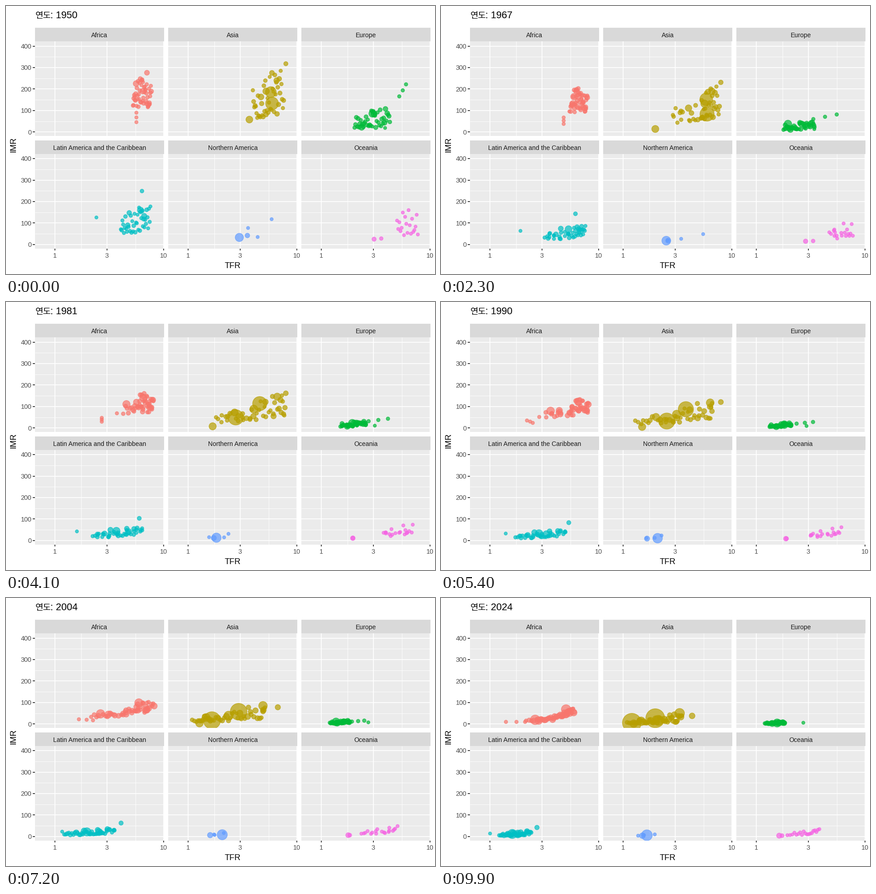
These frames come from a looping animation (947 by 592 pixels, 10 s). A matplotlib script:

```python
import numpy as np
import matplotlib.pyplot as plt
from matplotlib.animation import FuncAnimation
from matplotlib.patches import Rectangle

W, H, DPI = 947, 592, 64
PT = 72 / DPI  # points per pixel
FRAMES = 100
START, END = 1950, 2024
YEARS = np.linspace(START, END, FRAMES)
TAU = np.linspace(0, 1, FRAMES)
DECADE, HUNDRED = 240, 47.45  # pixels per factor of ten in TFR, per 100 in IMR

LEFTS, TOPS = (64, 358, 652), (78, 326.5)
PANEL_W, PANEL_H, STRIP_H = 285, 209, 30
NAMES = ("Africa", "Asia", "Europe",
         "Latin America and the Caribbean", "Northern America", "Oceania")
COLORS = ("#F8766D", "#B79F00", "#00BA38", "#00BFC4", "#619CFF", "#F564E3")
BENDS = (1.4, 1.3, 0.85, 0.8, 0.7, 0.9)  # below 1: mortality falls early
AFRICA, ASIA, EUROPE, LATIN, NORTH, OCEANIA = range(6)

rng = np.random.default_rng(7)
paths = [[] for _ in NAMES]


def corner(panel):
    return LEFTS[panel % 3], TOPS[panel // 3]


def origin(panel):
    """Pixel position of TFR = 1, IMR = 0."""
    left, top = corner(panel)
    return left + 44.3, top + 200.4


def radius(pop):
    return 3.4 + 17.6 * np.sqrt(pop / 1450)


def add(panel, pop, imr, tfr, years, bend=None):
    """A country: mortality decays, fertility moves log-linearly between turning years."""
    ox, oy = origin(panel)
    log_tfr = np.interp(YEARS, years, np.log10(tfr))
    deaths = imr[0] * (imr[1] / imr[0]) ** TAU ** (bend or BENDS[panel])
    r0, r1 = radius(pop[0]), radius(pop[1])
    paths[panel].append((ox + DECADE * log_tfr,
                         oy - HUNDRED * deaths / 100,
                         r0 + (r1 - r0) * TAU))


def mix(u, tie):
    """Ranks that follow u as closely as tie (0 to 1)."""
    blend = tie * u + (1 - tie) * rng.permutation(u)
    return (np.argsort(np.argsort(blend)) + 0.5) / len(u)


def between(bounds, rank):
    lo, hi = bounds
    return lo * (hi / lo) ** rank


def cloud(panel, n, pop, growth, tfr0, tfr1, imr0, imr1, fall, span,
          tie=0.8, tie0=0.4, tie1=0.5, skew=0.8, rise=1.0):
    """Many countries: those with low final fertility begin their decline first."""
    u = (np.arange(n) + 0.5) / n
    first = between(tfr0, mix(u, tie))
    last = between(tfr1, u ** skew)
    mort0 = between(imr0, mix(u, tie0))
    mort1 = between(imr1, mix(u, tie1))
    people = np.minimum(pop * np.exp(rng.normal(0, 1.2, n)), 50)
    begin = fall[0] + (fall[1] - fall[0]) * u
    stop = np.minimum(begin + span, END)
    for i in range(n):
        add(panel, (people[i], people[i] * growth), (mort0[i], mort1[i]),
            (first[i], first[i] * rise, last[i]), (START, begin[i], stop[i]))


# Typical countries of each region
cloud(AFRICA, 49, 3, 5.5, (5.2, 7.7), (2.0, 6.0), (115, 250), (15, 72),
      fall=(1965, 2010), span=35, tie=0.4, tie0=0.05, tie1=0.75, skew=0.6, rise=1.07)
cloud(ASIA, 43, 4, 4, (3.9, 7.6), (1.05, 3.5), (65, 290), (4, 45),
      fall=(1955, 1985), span=40, rise=1.03)
cloud(EUROPE, 41, 5, 1.2, (2.0, 4.3), (1.18, 1.83), (20, 110), (2, 9),
      fall=(1957, 1957), span=40, tie=0.6, tie1=0.3)
cloud(LATIN, 40, 1.5, 3.5, (4.0, 7.6), (1.19, 2.4), (53, 180), (4, 25),
      fall=(1958, 1975), span=45)
cloud(OCEANIA, 19, 0.1, 3, (4.9, 7.8), (1.85, 3.85), (42, 166), (6, 36),
      fall=(1962, 1975), span=50, tie=0.6, tie0=0.1)

# The largest populations and the loners outside the clouds
add(AFRICA, (37, 232), (190, 68), (6.4, 6.5, 5.0), (1950, 1992, 2024))
add(AFRICA, (21, 116), (276, 16), (7.0, 5.7, 3.1, 2.8), (1950, 1980, 2003, 2024))
for k in range(3):
    add(AFRICA, (0.4, 0.9), (90 - 22 * k, 10), (5.6, 5.0, 2.65, 1.4 + 0.35 * k),
        (1950, 1966, 1981, 2012))

add(ASIA, (544, 1420), (133, 6), (5.9, 5.9, 2.8, 2.5, 1.6, 1.75, 1.2),
    (1950, 1969, 1978, 1991, 1997, 2016, 2024))
add(ASIA, (346, 1450), (186, 27), (5.75, 5.8, 1.97), (1950, 1968, 2024), bend=1.55)
add(ASIA, (69, 284), (190, 17), (5.2, 5.6, 2.4, 2.1), (1950, 1968, 2000, 2024))
add(ASIA, (37, 251), (240, 50), (6.5, 6.6, 3.3), (1950, 1988, 2024))
add(ASIA, (84, 124), (58, 2), (3.65, 2.15, 1.25), (1950, 1960, 2005), bend=0.6)
add(ASIA, (8, 42), (318, 38), (7.9, 7.9, 4.3), (1950, 1996, 2024))

add(EUROPE, (103, 145), (86, 5), (2.95, 1.95, 1.9, 1.25, 1.75, 1.55),
    (1950, 1967, 1989, 2000, 2015, 2024))
add(EUROPE, (0.1, 0.1), (19, 6), (3.85, 2.7), (1950, 2000))
for k in range(3):
    add(EUROPE, (1, 2), (222 - 28 * k, 7 - k), (6 - 0.4 * k, 5.5 * 0.78 ** k, 1.6 - 0.1 * k),
        (1950, 1967, 2024))

add(LATIN, (54, 212), (160, 12), (6.1, 5.9, 1.9, 1.6), (1950, 1963, 2005, 2024))
add(LATIN, (28, 131), (133, 12), (6.6, 6.8, 3.1, 1.8), (1950, 1971, 1992, 2024))
add(LATIN, (3, 12), (249, 42), (6.3, 5.9, 2.7), (1950, 1985, 2024))
add(LATIN, (0.1, 0.1), (126, 14), (2.4, 1.0), (1950, 2015))

add(NORTH, (0.1, 0.1), (77, 4), (3.55, 3.45, 1.55, 1.75, 1.37),
    (1950, 1967, 1980, 2004, 2024))
add(NORTH, (14, 40), (42, 4), (3.5, 2.6, 1.7, 1.5), (1950, 1967, 1981, 2024))
add(NORTH, (0.1, 0.1), (118, 10), (5.85, 5.5, 2.35, 1.95), (1950, 1967, 1980, 2024))
add(NORTH, (0.1, 0.1), (35, 7), (4.35, 2.56, 2.1, 1.55), (1950, 1967, 1982, 2016))
add(NORTH, (155, 345), (33, 6), (2.95, 2.5, 1.8, 2.07, 2.05, 1.65),
    (1950, 1967, 1980, 1990, 2008, 2024))

for k in range(2):
    add(OCEANIA, (8 - 6 * k, 27 - 22 * k), (25 + 3 * k, 4),
        (3.05 + 0.5 * k, 2.85 + 0.5 * k, 1.95, 1.62 + 0.1 * k), (1950, 1967, 1980, 2024))

paths = [np.array(p) for p in paths]  # panel -> (country, x/y/radius, frame)

fig = plt.figure(figsize=(W / DPI, H / DPI), dpi=DPI, facecolor="white")
ax = fig.add_axes((0, 0, 1, 1))
ax.set(xlim=(0, W), ylim=(H, 0))
ax.axis("off")


def label(x, y, s, px, color="black", ha="center", va="baseline",
          family="Liberation Sans", **kw):
    return ax.text(x, y, s, fontsize=px * PT, color=color, ha=ha, va=va,
                   family=family, **kw)


def line(xs, ys, width, color="white"):
    ax.plot(xs, ys, color=color, lw=width * PT, zorder=2, solid_capstyle="butt")


MAJOR, MINOR = 1.78, 0.89
dots = []
for i, (name, color) in enumerate(zip(NAMES, COLORS)):
    left, top = corner(i)
    right, bottom = left + PANEL_W, top + PANEL_H
    ox, oy = origin(i)
    panel = ax.add_patch(Rectangle((left, top), PANEL_W, PANEL_H, fc="#EBEBEB", lw=0))
    ax.add_patch(Rectangle((left, top - STRIP_H), PANEL_W, STRIP_H, fc="#D9D9D9", lw=0))
    label(left + PANEL_W / 2, top - 9, name, 13.95, "#1A1A1A")

    for imr in range(0, 401, 50):
        y = oy - imr / 100 * HUNDRED
        major = imr % 100 == 0
        line((left, right), (y, y), MAJOR if major else MINOR)
        if major and i % 3 == 0:
            line((left - 4.6, left), (y, y), MAJOR, "#333333")
            label(left - 7.5, y + 5.2, str(imr), 14.4, "#4D4D4D", "right")

    ticks = np.log10((1, 3, 10)) * DECADE + ox
    for x in (ticks[:-1] + ticks[1:]) / 2:
        line((x, x), (top, bottom), MINOR)
    for x, tfr in zip(ticks, (1, 3, 10)):
        line((x, x), (top, bottom), MAJOR)
        if i >= 3:
            line((x, x), (bottom, bottom + 4.6), MAJOR, "#333333")
            label(x, bottom + 20.5, str(tfr), 14.4, "#4D4D4D")

    sc = ax.scatter([], [], color=color, alpha=0.7, linewidths=1.18 * PT, zorder=3)
    sc.set_clip_path(panel)
    dots.append(sc)

label(500.5, 579.3, "TFR", 18.3)
label(17, 306, "IMR", 18.3, rotation=90, va="center")
label(65, 26.5, "연도", 19, ha="left", family="Noto Sans CJK JP")
title = label(98.5, 27, "", 21.5, ha="left")


def update(i):
    title.set_text(f": {round(YEARS[i])}")
    for sc, path in zip(dots, paths):
        sc.set_offsets(path[:, :2, i])
        sc.set_sizes((2 * path[:, 2, i] * PT) ** 2)
    return [title, *dots]


anim = FuncAnimation(fig, update, frames=FRAMES, interval=100,
                     repeat=True, repeat_delay=0, blit=False)
plt.show()
```
